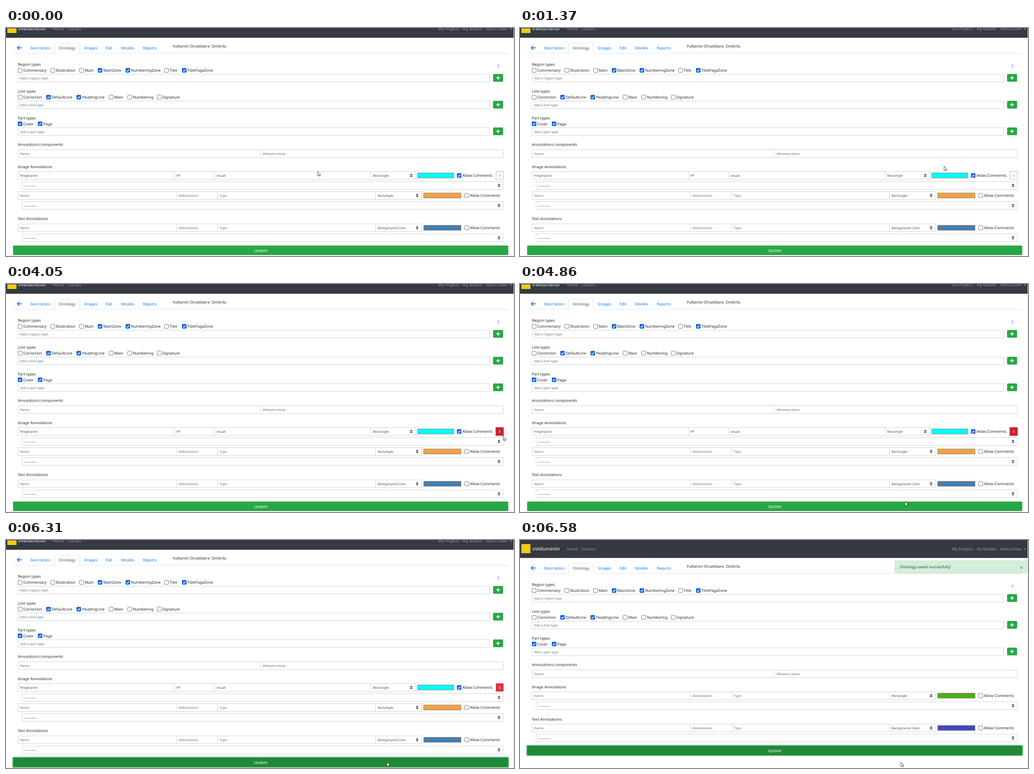
Write an HTML page that moves like this. It is 1117x501 px and loops after 8 s.

```html
<!DOCTYPE html>
<html lang="en">
<head>
<meta charset="utf-8">
<title>Ontology form</title>
<style>
  html, body { margin: 0; width: 100%; height: 100%; overflow: hidden; background: #fff; }
  svg { display: block; }
  text { font-family: "Noto Sans", "Open Sans", sans-serif; text-rendering: geometricPrecision; white-space: pre; }
</style>
</head>
<body>
<svg id="stage" width="1117" height="501" viewBox="0 0 1117 501"></svg>
<script>
const INK = '#212529', MUTED = '#6c757d', LINK = '#007bff', EDGE = '#ced4da', GREEN = '#28a745';
const BODY = 8.4, SMALL = 7.4;

// Markup helpers; text is placed by the middle of its capitals.
const text = (x, cy, str, { size = BODY, fill = INK, weight = 400, anchor = 'start' } = {}) =>
  `<text x="${x}" y="${cy + size * 0.36}" font-size="${size}" fill="${fill}" font-weight="${weight}" text-anchor="${anchor}">${str}</text>`;
const rect = (x, y, w, h, fill, extra = '') =>
  `<rect x="${x}" y="${y}" width="${w}" height="${h}" fill="${fill}" ${extra}/>`;
const path = (d, extra) => `<path d="${d}" ${extra}/>`;
const group = (id, body) => `<g id="${id}">${body}</g>`;

const field = (left, right, cy, label = '', fill = MUTED, size = SMALL) =>
  rect(left + .5, cy - 8.5, right - left, 17, '#fff', `stroke="${EDGE}"`) +
  text(left + 5, cy + .4, label, { size, fill });

const arrows = (x, cy) =>
  path(`M${x - 3} ${cy - .8}h6l-3-3.2zM${x - 3} ${cy + .8}h6l-3 3.2z`, 'fill="#343a40"');

const checkbox = (x, cy, label, checked) =>
  (checked
    ? rect(x, cy - 5, 10, 10, '#0a62dd', 'rx="2"') +
      path(`M${x + 2.2} ${cy + .2}l2 2.1 3.7-4.4`, 'fill="none" stroke="#fff" stroke-width="1.5"')
    : rect(x + .5, cy - 4.5, 9, 9, '#fff', 'rx="1.5" stroke="#7b7b84"')) +
  text(x + 12, cy + .3, label);

const typeSection = (cy, title, kind, boxes) =>
  text(26, cy, title) +
  boxes.map(([x, label, on]) => checkbox(x, cy + 13, label, on)).join('') +
  field(26, 1063, cy + 30, `Add a ${kind} type`) +
  rect(1071, cy + 21, 22, 17, GREEN, 'rx="2"') +
  path(`M1078 ${cy + 29.5}h8m-4-4v8`, 'stroke="#fff" stroke-width="1.8"');

const dashSelect = cy => field(35, 1093, cy, '---------', '#495057', 9.1) + arrows(1084, cy);

// One annotation line: three inputs, a select, a colour swatch and a checkbox.
function annotation(cy, { cuts, labels, mode, color, fill = MUTED, comments = false }) {
  const [a, b, c, d, e, f] = cuts;
  return field(26, a, cy, labels[0], fill) + field(a, b, cy, labels[1], fill) + field(b, c, cy, labels[2], fill) +
    rect(d + .5, cy - 8.5, e - d, 17, '#fff', 'stroke="#eceef0"') +
    field(c, d, cy, mode, '#495057') + arrows(d - 10, cy) +
    rect(d + 4.5, cy - 5.5, e - d - 8, 11, color, 'stroke="#858585"') +
    checkbox(f, cy, 'Allow Comments', comments) + dashSelect(cy + 22);
}
const blankLine = (cy, mode, color) => annotation(cy, {
  cuts: [374, 465, 812, 914, 1004, 1008], labels: ['Name', 'Abbreviation', 'Type'], mode, color
});
const savedLine = cy => annotation(cy, {
  cuts: [370, 458, 802, 901, 988, 991.5], labels: ['Fingerprint', 'FP', 'visual'],
  mode: 'Rectangle', color: '#0ff', fill: '#495057', comments: true
});

const navText = (x, str) => text(x, 20, str, { size: 8.5, fill: '#9a9da0' });
const tab = (x, str) => text(x, 62.3, str, { fill: LINK });
const header =
  rect(0, 0, 1117, 39.5, '#343a40') + rect(3, 9, 20, 20, '#f9c915') +
  text(27, 19, 'oVellumentir', { size: 10.2, fill: '#fff' }) +
  navText(103, 'Home') + navText(135.5, 'Contact') + navText(950, 'My Projects') +
  navText(1004, 'My Models') + navText(1056, 'Hello Omev') +
  path('M1108 19.2h5l-2.5 2.6z', 'fill="#9a9da0"') +
  path('M15 73.5H107.5V53q0-2 2-2h50.500q2 0 2 2V73.500H1105', 'fill="none" stroke="#dee2e6"') +
  path('M35 61.500H25m4.500-4.500L25 61.500l4.500 4.500', 'fill="none" stroke="#0a66d8" stroke-width="1.7"') +
  tab(53, 'Description') + text(116, 62.3, 'Ontology', { fill: '#495057' }) +
  tab(171.5, 'Images') + tab(219, 'Edit') + tab(253, 'Models') + tab(301, 'Reports') +
  text(367, 57.6, 'Fulbertin Orvatillaire. Ombrils.') +
  text(1082.5, 102.500, '?', { size: 11.5, fill: '#74b8f8', weight: 700, anchor: 'middle' });

const sections =
  typeSection(98, 'Region types', 'region', [
    [26, 'Commentary'], [98, 'Illustration'], [161, 'Main'], [202, 'MainZone', 1],
    [263, 'NumberingZone', 1], [348, 'Title'], [387, 'TitlePageZone', 1]]) +
  typeSection(157, 'Line types', 'line', [
    [26, 'Correction'], [88.5, 'DefaultLine', 1], [155, 'HeadingLine', 1],
    [226, 'Main'], [267, 'Numbering'], [332, 'Signature']]) +
  typeSection(215.5, 'Part types', 'part', [[26, 'Cover', 1], [70, 'Page', 1]]) +
  text(26, 274, 'Annotations components') +
  field(26, 559, 294, 'Name') + field(559, 1093, 294, 'Allowed values') +
  text(26, 322.7, 'Image Annotations');

const removeButton =
  rect(1075.500, 332.500, 20, 20, '#f3b3ba', 'id="removeRing" rx="2.5"') +
  rect(1077.500, 333.500, 16, 17, '#fff', 'id="removeBox" stroke="#adb5bd"') +
  `<g id="removeMark">${text(1085.500, 342.3, 'X', { size: 7.2, anchor: 'middle' })}</g>`;

const before = savedLine(342) + removeButton + blankLine(386, 'Rectangle', '#f0a243') +
  text(26, 437.3, 'Text Annotations') + blankLine(457, 'Background Color', '#487eab');
const after = blankLine(342, 'Rectangle', '#4cad18') +
  text(26, 393.5, 'Text Annotations') + blankLine(413, 'Background Color', '#4347c0');

const update =
  rect(13.5, -2, 1093, 25, '#8fd0a0', 'id="updateRing" rx="3"') +
  rect(15.5, 0, 1089, 21, GREEN, 'id="updateBox" rx="2"') +
  text(560, 10.8, 'Update', { size: 8.7, fill: '#fff', anchor: 'middle' });

const helpLine = (cy, str, weight = 400, size = weight > 400 ? 8.15 : BODY) =>
  text(38, cy, str, { size, fill: '#004085', weight });
const help = rect(26.5, -10, 1067, 137.5, '#cce5ff', 'stroke="#b8daff"') +
  helpLine(9, 'The default configuration only contains semantic types.') +
  helpLine(22, 'It is not recommended to mix semantic, stylistic and layout types.') +
  helpLine(35.3, "It is required to hit 'Update' to add your new types to the document.", 700) +
  helpLine(62, 'Annotations:', 400, 10.4) +
  helpLine(79.500, 'Each Annotation can store values for different components.') +
  helpLine(92.500, 'Components needs to be saved first before adding them to Annotation definitions.', 700) +
  helpLine(106, 'Annotation types allow to regroup the corresponding buttons in the editing interface (and may be used as a hint for import/export).');

const notice = rect(824.5, 45.5, 292, 27, '#d4edda', 'rx="2" stroke="#c3e6cb"') +
  text(835, 59.3, 'Ontology saved successfully!', { fill: '#155724' }) +
  text(1102.5, 60.5, '×', { size: 12, fill: '#6b8f76', weight: 700, anchor: 'middle' });

const outline = 'fill="#fff" stroke="#222" stroke-width=".8" stroke-linejoin="round"';
const pointers =
  group('arrow', path('M.4.400V10.200L2.600 8.200 4.200 11.500 5.700 10.800 4.200 7.600H7.100z', outline)) +
  group('hand', path('M2.600 7V1.200a.9.9 0 0 1 1.800 0V4.600l3.200.8q1.200.3 1.100 1.600L8.200 9.500 7.600 12H3.400L.6 8.200q-.5-1 .5-1.200z', outline));

document.getElementById('stage').innerHTML =
  rect(0, 0, 1117, 501, '#fff') +
  group('page', group('header', header) + sections + group('before', before) +
    group('after', after) + group('update', update)) +
  group('help', help) + group('notice', notice) +
  rect(0, 0, 1117, 1, '#2b4a7c') + rect(1116, 1, 1, 500, '#dde1e6') +
  group('pointer', pointers);

const el = Object.fromEntries([...document.querySelectorAll('[id]')].map(n => [n.id, n]));
const show = (node, on) => node.setAttribute('visibility', on ? 'visible' : 'hidden');
const move = (node, x, y) => node.setAttribute('transform', `translate(${x} ${y})`);

const LOOP = 8000;
// start, x, y, pointer shape
const POINTER = [
  [0, 685, 314.5, 'arrow'], [120, 684.5, 313, 'arrow'], [280, 702, 301, 'arrow'], [680, 701.5, 300, 'arrow'],
  [1100, 722.5, 303, 'arrow'], [1240, 840, 312, 'arrow'], [1370, 932, 303, 'arrow'], [1810, 983, 309, 'arrow'],
  [1960, 982.5, 310, 'arrow'], [2230, 1010, 313, 'arrow'], [2370, 1074, 315.5, 'arrow'],
  [2660, 1083, 323, 'arrow'], [2810, 1091, 328.5, 'hand'], [3780, 1090, 332, 'hand'], [3910, 1089.5, 334.5, 'hand'],
  [4050, 1093, 333.5, 'arrow'], [4330, 1040, 360, 'arrow'], [4470, 1006, 376, 'arrow'], [4600, 945, 411, 'arrow'],
  [4730, 884, 450, 'arrow'], [4860, 846, 477.5, 'arrow'], [5010, 838, 484.5, 'hand'], [5150, 835.5, 487, 'hand'],
  [5270, 834, 488, 'hand'], [6310, 837, 487.5, 'arrow']
];

// start, background, border, mark colour, ring opacity
const REMOVE = [
  [0, '#fff', '#adb5bd', '#6c757d', 0], [2810, '#c82333', '#bd2130', '#fff', 0],
  [3640, '#c82333', '#bd2130', '#fff', .5], [3780, '#c82333', '#bd2130', '#fff', 1],
  [6040, '#dc3545', '#dc3545', '#fff', 0]
];

// start, scroll offset, button top
const VIEW = [[0, -18, 496], [6430, 46, 452], [6580, 0, 452]];

const at = (table, t) => table.findLast(step => step[0] <= t);

function draw(t) {
  const [, x, y, shape] = at(POINTER, t);
  move(el.pointer, x, y);
  show(el.arrow, shape === 'arrow');
  show(el.hand, shape === 'hand');

  const [, back, border, mark, ring] = at(REMOVE, t);
  el.removeBox.setAttribute('fill', back);
  el.removeBox.setAttribute('stroke', border);
  el.removeMark.firstChild.setAttribute('fill', mark);
  el.removeRing.setAttribute('opacity', ring);

  const saved = t >= 6430, done = t >= 6580, reloading = saved && !done;
  const [, offset, buttonTop] = at(VIEW, t);
  move(el.page, 0, offset);
  move(el.update, 0, buttonTop);
  el.before.style.display = saved ? 'none' : '';
  el.after.style.display = saved ? '' : 'none';
  show(el.header, !reloading);
  show(el.help, reloading);
  show(el.notice, done);
  show(el.updateRing, t >= 6040 && !reloading);
  el.updateBox.setAttribute('fill', t >= 5010 && !reloading ? '#218838' : GREEN);
}

const start = performance.now();
function tick() {
  draw((performance.now() - start) % LOOP);
  requestAnimationFrame(tick);
}
tick();
</script>
</body>
</html>
```
